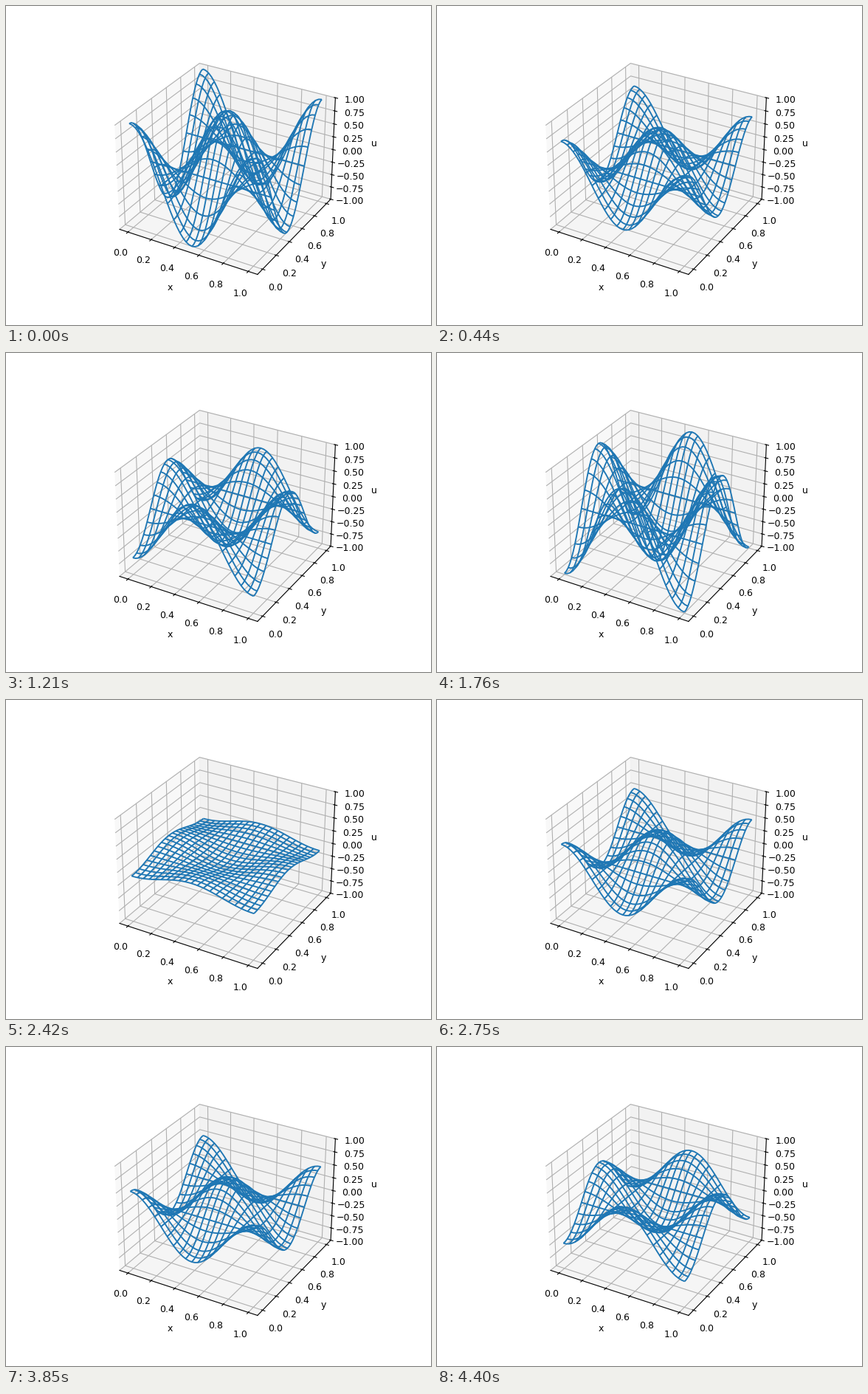
These frames come from a looping animation (576x432 px, 4510 ms). A matplotlib script:

```python
import numpy as np
import matplotlib.pyplot as plt
from matplotlib.animation import FuncAnimation

FRAMES = 41
INTERVAL = 110  # ms
PERIOD = 30     # frames per oscillation
CELLS = 40
STRIDE = 2

grid = np.linspace(0, 1, CELLS + 1)
x, y = np.meshgrid(grid, grid, indexing="ij")
mode = np.cos(2 * np.pi * x) * np.cos(2 * np.pi * y)

fig = plt.figure(figsize=(5.76, 4.32), dpi=90)
fig.set_dpi(100)
fig.set_size_inches(5.76, 4.32)
plt.rcParams["font.size"] = 9
ax = fig.add_subplot(projection="3d")


def draw(n):
    """Standing wave with free edges on the unit square."""
    ax.clear()
    u = mode * np.cos(2 * np.pi * n / PERIOD)
    ax.plot_wireframe(x, y, u, rstride=STRIDE, cstride=STRIDE, lw=1.35)
    ax.set_zlim(-1, 1)
    ax.set(xlabel="x", ylabel="y", zlabel="u")


anim = FuncAnimation(fig, draw, frames=FRAMES, interval=INTERVAL,
                     init_func=lambda: None, repeat=True, repeat_delay=0)
plt.show()
```
